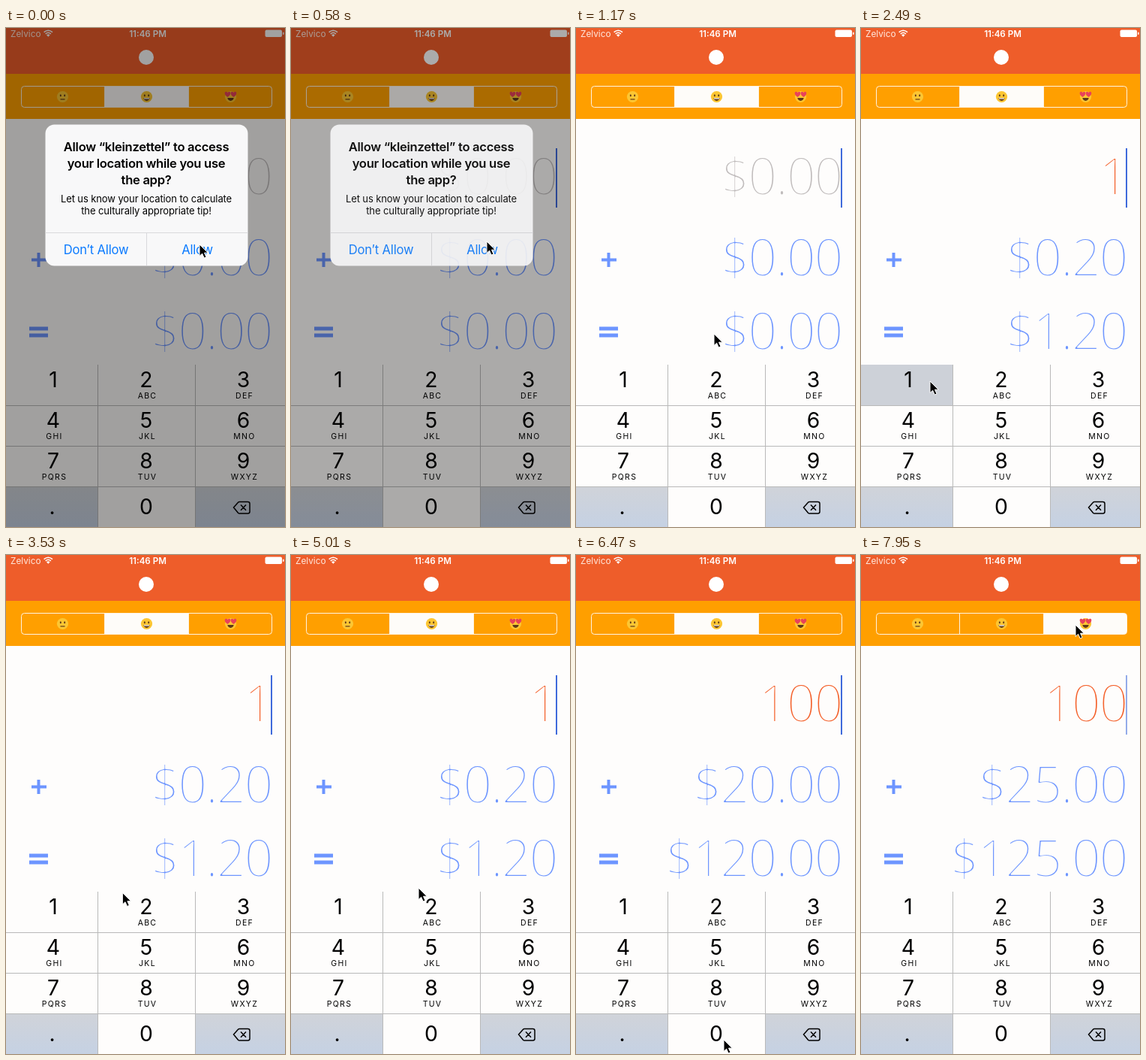
Recreate the animation shown at these times as an HTML page. Size 372x664 px, loop 8000 ms.

```html
<!DOCTYPE html>
<html lang="en">
<head>
<meta charset="utf-8">
<title>Tip calculator</title>
<style>
  html, body { margin: 0; width: 100%; height: 100%; overflow: hidden; background: #fefdfc; }
  svg { display: block; width: 372px; height: 664px; font-family: Inter, Roboto, sans-serif; }
  text { text-anchor: middle; }
  /* The paper-coloured outline trims the light weight to a hairline */
  .amount {
    font: 300 67.5px "Open Sans", "Noto Sans", sans-serif; text-anchor: end; letter-spacing: -1.6px;
    stroke: #fefdfc; stroke-width: 2px; stroke-linejoin: round;
  }
  .blue { fill: #6d95ff; }
  .digit { font-size: 28.3px; }
  .letters { font-size: 10.5px; letter-spacing: 1.3px; }
  .title { font-size: 16.6px; font-weight: 600; letter-spacing: -.3px; }
  .note { font-size: 13px; letter-spacing: -.1px; }
  .button { font-size: 16.6px; fill: #0a7aff; letter-spacing: -.2px; }
</style>
</head>
<body>
<svg viewBox="0 0 372 664">
  <defs>
    <linearGradient id="side" x2="0" y2="1">
      <stop stop-color="#d0d3d9"/><stop offset="1" stop-color="#c5d1e3"/>
    </linearGradient>
    <clipPath id="pill"><rect x="20.5" y="77.5" width="334" height="28" rx="4"/></clipPath>
  </defs>

  <rect width="372" height="664" fill="#fefdfc"/>
  <rect width="372" height="61" fill="#ee5d2a"/>
  <rect y="61" width="372" height="60" fill="#ff9f00"/>

  <g fill="#fff">
    <text x="6" y="11.5" font-size="11.8" style="text-anchor:start" fill="#ffe9df">Zelvico</text>
    <text x="189" y="11.5" font-size="11.6" font-weight="600">11:46 PM</text>
    <path d="M50.6 5.6Q56.3 .9 62 5.6M52.7 7.8Q56.3 4.8 59.9 7.8" fill="none" stroke="#fff" stroke-width="1.5"/>
    <path d="M54 9.2Q56.3 7.4 58.6 9.2L56.3 11.8Z"/>
    <rect x="345.5" y="2.5" width="22.5" height="9.5" rx="2"/>
    <rect x="369" y="5.5" width="1.5" height="3.5" rx=".7"/>
    <circle cx="187" cy="39" r="10"/>
  </g>

  <g clip-path="url(#pill)"><rect id="choice" y="77" width="112" height="29" fill="#fefcf9"/></g>
  <path d="M131.5 78V105M243.5 78V105" stroke="#fff3e0"/>
  <rect x="20.5" y="77.5" width="334" height="28" rx="4" fill="none" stroke="#fff3e0"/>
  <g id="faces"></g>

  <g class="blue">
    <path d="M34 306.5H41.5V299H45.5V306.5H54V310.5H45.5V318H41.5V310.5H34Z"/>
    <path d="M31 397.5H56V402.5H31ZM31 406.5H56V411.5H31Z"/>
  </g>
  <text id="bill" class="amount" x="354.8" y="222"></text>
  <text id="tip" class="amount blue" x="354.8" y="330"></text>
  <text id="total" class="amount blue" x="354.8" y="428"></text>
  <rect id="caret" x="353" y="160" width="2" height="79" fill="#3f6adb"/>

  <g id="keys"></g>
  <rect id="dim" width="372" height="664"/>

  <g id="alert">
    <rect x="52.5" y="128.5" width="270" height="188" rx="12" fill="#f8f8f9"/>
    <path d="M52.5 272.5H322.5M187.5 273V316" stroke="#d9d9dc"/>
    <text class="title" x="187" y="164">Allow “kleinzettel” to access</text>
    <text class="title" x="187" y="186">your location while you use</text>
    <text class="title" x="187" y="208">the app?</text>
    <text class="note" x="187" y="232">Let us know your location to calculate</text>
    <text class="note" x="187" y="248">the culturally appropriate tip!</text>
    <text class="button" x="120" y="301">Don’t Allow</text>
    <text class="button" x="255" y="301">Allow</text>
  </g>

  <path id="pointer" d="M0 0V15.5L3.6 12.2L6.2 18L9 16.8L6.5 11.2H11.3Z" stroke="#fff"/>
</svg>
<script>
  const LOOP = 8000, HOLD = 147.35, FIRST = 140, BLINK = 970;
  const $ = id => document.getElementById(id);
  const set = (id, name, value) => $(id).setAttribute(name, value);
  const clamp = v => Math.min(1, Math.max(0, v));
  const ease = v => { const u = clamp(v); return u * u * (3 - 2 * u); };

  // Faces
  const face = (i, parts) => `<g transform="translate(${75.5 + i * 112} 91.5)">
    <circle r="7.6" fill="#fcc633"/><g fill="#5f3a19">${parts}</g></g>`;
  const pair = draw => draw(-1) + draw(1);
  const eyes = pair(s => `<ellipse cx="${s * 2.7}" cy="-1.8" rx="1" ry="1.5"/>`);
  const hearts = pair(s => `<path transform="translate(${s * 4} -3.6)" fill="#e8425a"
    d="M0 4C-5 1-4.5-3.6-1.8-3.2Q-.4-3 0-1.6Q.4-3 1.8-3.2C4.5-3.6 5 1 0 4Z"/>`);
  const grin = '<path d="M-4.2 1.6H4.2Q3.4 5.4 0 5.4T-4.2 1.6Z"/>';
  const teeth = '<path d="M-3.8 1.8H3.8L3.4 3H-3.4Z" fill="#fff"/>';
  $('faces').innerHTML = [eyes + '<path d="M-3 2.8H3V4H-3Z"/>', eyes + grin + teeth, grin + hearts]
    .map((parts, i) => face(i, parts)).join('');

  // Keypad
  const edges = [0, 122.5, 252.5, 372], mids = [63, 187, 316.5];
  const labels = '1,2 ABC,3 DEF,4 GHI,5 JKL,6 MNO,7 PQRS,8 TUV,9 WXYZ,.,0,'.split(',');
  const isSide = label => label === '.' || label === '';
  const keys = labels.map((label, i) => {
    const col = i % 3, y = 448 + Math.floor(i / 3) * 54;
    const [digit, letters] = label.split(' ');
    const base = i < 9 ? y + 30 : y + 37;
    return `<rect id="key${digit}" x="${edges[col]}" y="${y}" width="${edges[col + 1] - edges[col]}" height="54"
        fill="${isSide(label) ? 'url(#side)' : '#fefdfc'}"/>
      <text class="digit" x="${mids[col] - (digit === '.' ? 1.5 : 0)}" y="${base}">${digit}</text>
      <text class="letters" x="${mids[col] + 1.5}" y="${y + 45}">${letters || ''}</text>`;
  });
  $('keys').innerHTML = keys.join('') +
    `<path d="M122.5 448V664M252.5 448V664M0 502.5H372M0 556.5H372M0 610.5H372" stroke="#b9b9b9"/>
    <path d="M303.5 638L309.5 631.2Q310.2 630.5 311.2 630.5H322.5Q325 630.5 325 633V643.5Q325 646 322.5 646H311.2Q310.2 646 309.5 645.2Z
      M313 634.5L320 641.8M320 634.5L313 641.8" fill="none" stroke="#000" stroke-width="1.5"/>`;

  const moves = [
    { from: 0, to: 440, x: 261, y: 284 },
    { from: 600, to: 1170, x: 184, y: 407 },
    { from: 1200, to: 2190, x: 92, y: 470 },
    { from: 2900, to: 3690, x: 163, y: 447 },
    { from: 4800, to: 5000, x: 170, y: 443 },
    { from: 5010, to: 5440, x: 197, y: 645 },
    { from: 6500, to: 7480, x: 286, y: 93 }
  ];
  const taps = [
    { time: 2480, key: '1' }, { time: 5570, key: '0' }, { time: 6300, key: '0' }
  ];
  const DISMISS = 480, GENEROUS = 7750, PRESS = 130;

  function pointerAt(t) {
    const p = { x: 258, y: 288 };
    for (const m of moves) {
      const u = ease((t - m.from) / (m.to - m.from));
      p.x += (m.x - p.x) * u;
      p.y += (m.y - p.y) * u;
    }
    return p;
  }

  // Typing restarts the blink: lit, fade out, dark
  function caretAt(t, typed) {
    const start = typed.length ? typed.at(-1).time : DISMISS + 100;
    return t < start ? 0 : 1 - clamp(((t - start) % BLINK - 590) / 200);
  }

  const money = v => '$' + v.toFixed(2);

  function draw(time) {
    // The picture advances in even holds
    const k = Math.floor((time - FIRST + 10) / HOLD);
    const t = k < 0 ? 0 : FIRST + k * HOLD;

    const typed = taps.filter(tap => t >= tap.time);
    const entry = typed.map(tap => tap.key).join('');
    const bill = Number(entry), rate = t < GENEROUS ? .2 : .25;
    $('bill').textContent = entry || money(0);
    set('bill', 'fill', entry ? '#f4602a' : '#c0bcbc');
    $('tip').textContent = money(bill * rate);
    $('total').textContent = money(bill * (1 + rate));
    set('choice', 'x', t < GENEROUS ? 131.5 : 243.5);
    set('caret', 'opacity', caretAt(t, typed));

    for (const key of ['0', '1']) {
      const held = typed.some(tap => tap.key === key && t < tap.time + PRESS);
      set('key' + key, 'fill', held ? '#cdd1d8' : '#fefdfc');
    }

    const alpha = 1 - ease((t - DISMISS) / 500);
    set('dim', 'opacity', alpha * .37);
    set('alert', 'opacity', alpha);

    const p = pointerAt(t);
    set('pointer', 'transform', `translate(${p.x} ${p.y})`);
  }

  function loop() {
    draw(performance.now() % LOOP);
    requestAnimationFrame(loop);
  }
  loop();
</script>
</body>
</html>
```
